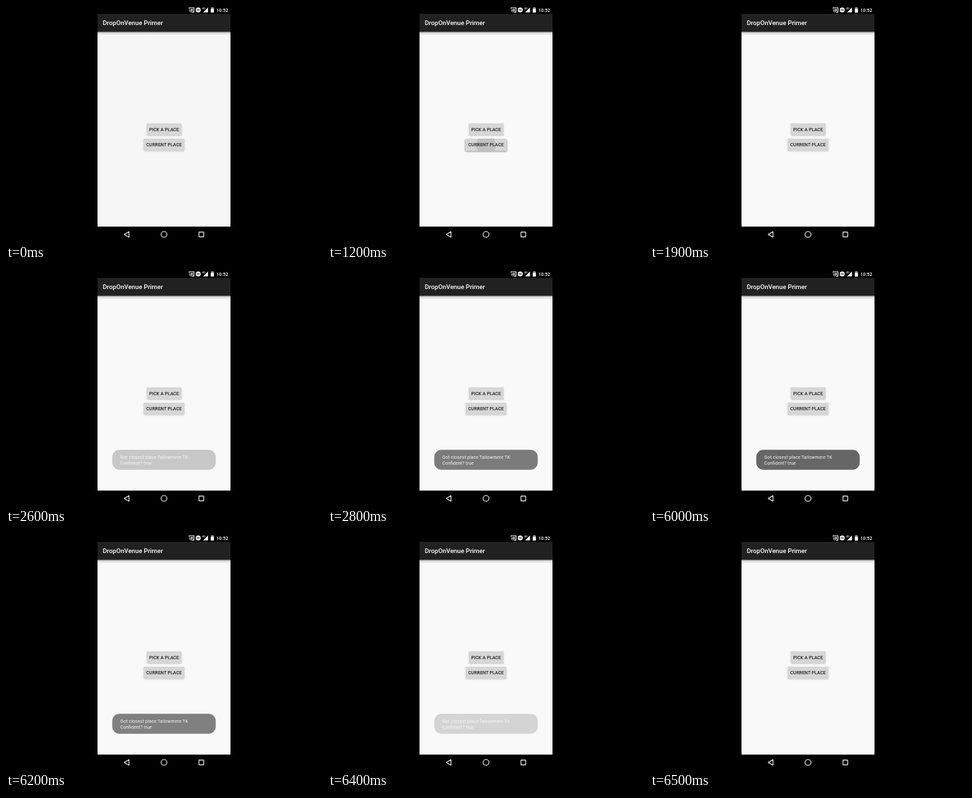
An HTML page for the animation above (6600 ms loop, 480x360 px).

```html
<!DOCTYPE html>
<html lang="en">
<head>
<meta charset="utf-8">
<title>Place demo</title>
<style>
  html, body { margin: 0; width: 100%; height: 100%; overflow: hidden; background: #000; }
  svg { display: block; width: 100vw; height: 100vh; }
  text { font-family: Roboto, sans-serif; font-weight: 500; font-size: 7px; fill: #fff; }
  .title { font-size: 9.7px; }
  .label { fill: #222; text-anchor: middle; }
  .line { fill: none; stroke: #fff; stroke-width: 1.1; }
  .toast text {
    font-family: "Roboto Condensed", Roboto, sans-serif;
    font-stretch: 75%; font-weight: 400; font-size: 8px; fill: #ececec;
  }
  .page, .toast, .lift, .ripple { animation: 6600ms step-end infinite; }
  .page { animation-name: page; }
  .toast { animation-name: toast; }
  .lift { animation-name: lift; }
  .ripple { animation-name: ripple; transform-origin: 240px 212px; }

  @keyframes page {
    0% { fill: #f6f6f6; }
    15.151%, 100% { fill: #f9f9f9; }
  }
  @keyframes lift {
    0% { opacity: 0; }
    18.181% { opacity: .5; }
    19.696% { opacity: 1; }
    22.727% { opacity: .6; }
    24.242% { opacity: .25; }
    25.757%, 100% { opacity: 0; }
  }
  @keyframes ripple {
    0% { opacity: 0; transform: scale(.3); }
    18.181% { opacity: .1; transform: scale(.45); }
    19.696% { opacity: .13; transform: scale(.75); }
    21.212% { opacity: .13; transform: scale(1); }
    22.727% { opacity: .09; transform: scale(1); }
    24.242% { opacity: .04; transform: scale(1); }
    25.757%, 100% { opacity: 0; transform: scale(1); }
  }
  /* decelerating fade in, accelerating fade out */
  @keyframes toast {
    0% { opacity: 0; }
    39.393% { opacity: .33; }
    40.909% { opacity: .63; }
    42.424% { opacity: .84; }
    43.939% { opacity: .96; }
    45.454% { opacity: 1; }
    90.909% { opacity: .985; }
    92.424% { opacity: .93; }
    93.939% { opacity: .81; }
    95.454% { opacity: .56; }
    96.969% { opacity: .24; }
    98.484%, 100% { opacity: 0; }
  }
</style>
</head>
<body>
<svg viewBox="0 0 480 360">
  <defs>
    <linearGradient id="barShadow" x2="0" y2="1">
      <stop offset="0" stop-opacity=".34"/>
      <stop offset=".4" stop-opacity=".12"/>
      <stop offset="1" stop-opacity="0"/>
    </linearGradient>
    <filter id="blur" x="-20%" y="-50%" width="140%" height="200%">
      <feGaussianBlur stdDeviation="1.2"/>
    </filter>
    <clipPath id="currentShape"><rect x="209" y="202.5" width="62" height="18.5" rx="1"/></clipPath>
  </defs>

  <rect width="480" height="360"/>
  <rect class="page" x="139" y="39" width="202" height="297.5"/>
  <rect x="139" y="12" width="202" height="27.5" fill="#212121"/>
  <rect x="139" y="39.5" width="202" height="5" fill="url(#barShadow)"/>
  <text class="title" x="147" y="29.3">DropOnVenue Primer</text>

  <!-- status bar -->
  <g>
    <path d="M278.2 4.2V2.8h7.3v6.6h-2.8" class="line" stroke-width=".9"/>
    <path d="M280 4.4h4v3.4h-2z" fill="#bbb"/>
    <path d="M278 5.6a4 4 0 0 1 4 4M278 7.4a2.2 2.2 0 0 1 2.2 2.2" class="line" style="stroke-width:.8"/>
    <circle cx="292" cy="6" r="3.8" fill="#fff"/>
    <path d="M289.8 6h4.4" stroke="#000" stroke-width="1.2"/>
    <path d="M306.8 2.2v7.6h-7.4z" fill="#fff"/>
    <rect x="298" y="1.8" width="5.2" height="4.2"/>
    <text x="298.2" y="5.4" style="font-size:3.8px">4G</text>
    <path d="M312.4 2h2v.8h1.4v7.2h-4.8V2.8h1.4z" fill="#fff"/>
    <path d="M311 2.8h4.8v1.5H311z" fill="#777"/>
    <text x="319.6" y="8.6">10:52</text>
  </g>

  <!-- buttons -->
  <g fill="#d6d6d6">
    <g fill="#000" opacity=".2" filter="url(#blur)">
      <rect x="214" y="180" width="52.5" height="18" rx="1"/>
      <rect x="209" y="203.5" width="62" height="18" rx="1"/>
    </g>
    <rect class="lift" x="208" y="204" width="64" height="18.5" rx="2" fill="#777" filter="url(#blur)"/>
    <rect x="213.7" y="179" width="52.8" height="18.5" rx="1"/>
    <rect x="209" y="202.5" width="62" height="18.5" rx="1"/>
    <g clip-path="url(#currentShape)"><circle class="ripple" cx="240" cy="212" r="34" fill="#000"/></g>
  </g>
  <text class="label" x="240.1" y="190.7">PICK A PLACE</text>
  <text class="label" x="240" y="214.3">CURRENT PLACE</text>

  <g class="toast">
    <rect x="161.4" y="274.2" width="157.2" height="30.6" rx="11" fill="#646464"/>
    <text x="173.6" y="287.8">Got closest place Tallowmere TK</text>
    <text x="173.6" y="297.2">Confident? true</text>
  </g>

  <!-- navigation bar -->
  <g class="line">
    <path d="M179.6 348.5l7.2-4.3v8.6z" stroke-linejoin="round"/>
    <circle cx="240" cy="348.4" r="4.4"/>
    <rect x="293.1" y="344.9" width="7.2" height="7.2" rx=".4"/>
  </g>
</svg>
</body>
</html>
```
